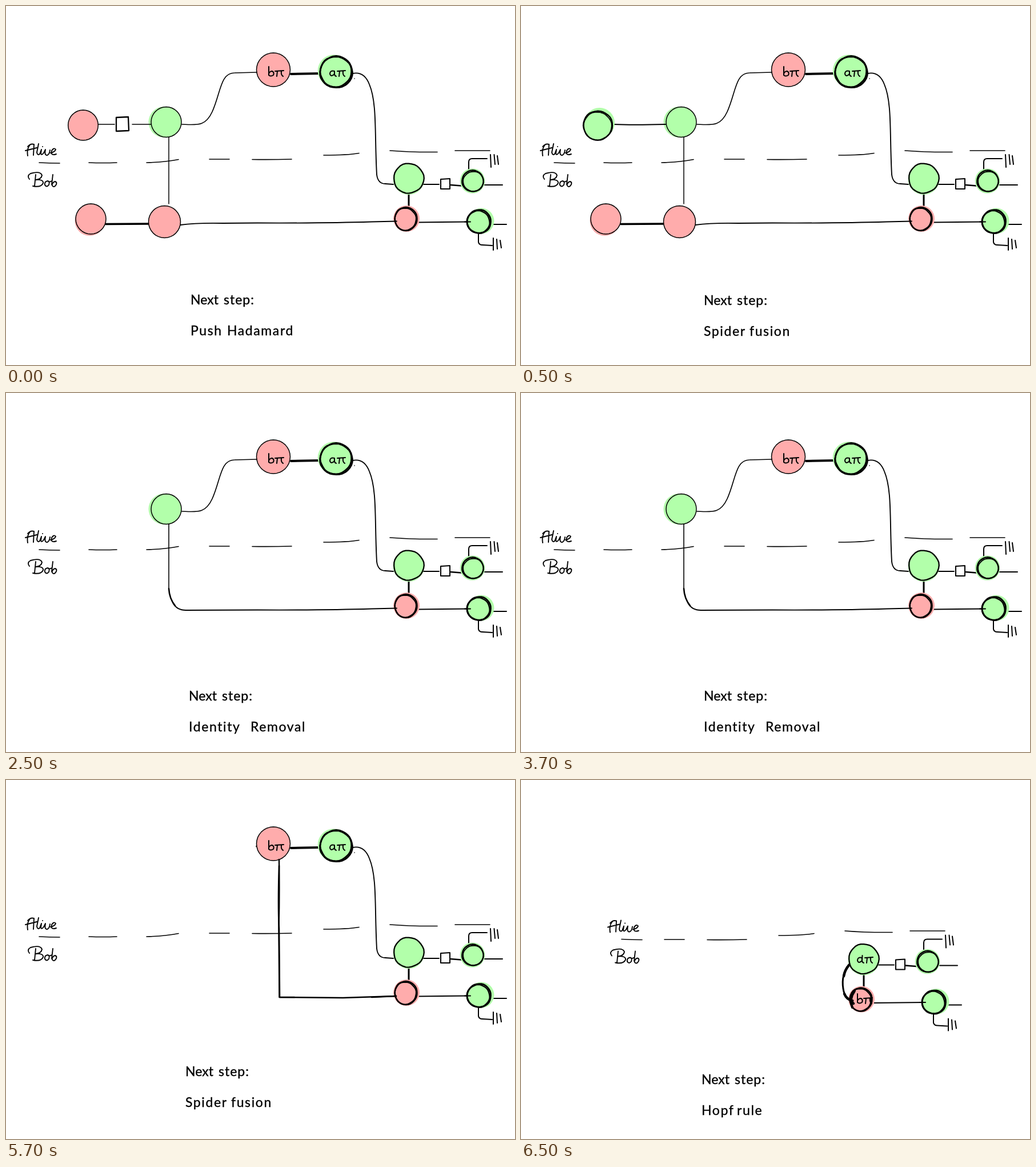
Write an HTML page that moves like this. It is 891x628 px and loops after 8 s.

```html
<!DOCTYPE html>
<html lang="en">
<head>
<meta charset="utf-8">
<title>Diagram rewriting</title>
<style>
html, body { margin: 0; width: 100%; height: 100%; overflow: hidden; background: #fff; }
svg { display: block; width: 100vw; height: 100vh; }
path { stroke-linecap: round; stroke-linejoin: round; }
text { font: 23px Lato, "Noto Sans", sans-serif; fill: #000; stroke: #000; stroke-width: .35px; }
.rule { letter-spacing: 1.6px; }
</style>
</head>
<body>
<svg id="stage" viewBox="0 0 891 628"></svg>
<script>
const PINK = '#ffacac', GREEN = '#b2ffaa';
const LOOP = 8000;

const ink = (d, w = 2) => `<path d="${d}" fill="none" stroke="#000" stroke-width="${w}"/>`;
const move = (x, y, body) => `<g transform="translate(${x} ${y})">${body}</g>`;

// Closed hand-drawn ring; k sets how uneven it is.
function ring(x, y, rx, ry, k = 0, phase = 0) {
  let d = '';
  for (let i = 0; i < 32; i++) {
    const a = i * Math.PI / 16;
    const r = 1 + k * (Math.sin(3 * a + phase) + .7 * Math.sin(7 * a + 2 * phase));
    d += (i ? 'L' : 'M') + (x + rx * r * Math.cos(a)).toFixed(1) + ' ' + (y + ry * r * Math.sin(a)).toFixed(1);
  }
  return d + 'Z';
}

function node(x, y, rx, ry, color, o = {}) {
  const { halo, w = 1.5, k = 0, again } = o;
  let s = '';
  if (halo) s += `<circle cx="${x + halo[0]}" cy="${y + halo[1]}" r="${halo[2]}" fill="${color}"/>`;
  s += `<path d="${ring(x, y, rx, ry, k, x)}" fill="${color}" stroke="#000" stroke-width="${w}"/>`;
  if (again) s += ink(ring(x + again[0], y + again[1], rx - 1, ry - 1, .015, y), w * .8);
  return s;
}

function caption(x, y, first, second, gap) {
  return `<text y="${y}"><tspan x="${x}">Next</tspan> <tspan x="${x + 58}" letter-spacing="1">step:</tspan></text>` +
    `<text class="rule" y="${y + 54}"><tspan x="${x}">${first}</tspan> <tspan x="${x + gap}">${second}</tspan></text>`;
}

// Handwritten labels
const alive = ink('M42 243Q36 250 38 262M38 246Q43 240 49 242L48 261M34 253L54 248M57 241L54 256Q55 262 59 259L62 251L61 258Q62 262 66 257L69 251Q67 262 72 261Q76 260 77 252M78 257Q86 255 87 251Q84 247 80 253Q78 263 88 259M64 246h.1', 1.9);
const bob = ink('M52 295L50 315M41 303Q36 297 43 293Q60 288 63 296Q62 303 52 304Q66 303 65 310Q61 318 47 315M73 306Q67 307 68 313Q71 318 75 313Q77 307 73 306Q76 309 80 306M82 295L80 312Q82 318 86 315Q91 309 86 307Q82 308 81 312', 1.9);
const bPi = ink('M460 106L460 121Q463 124 468 121Q470 116 466 114Q462 114 460 118M471 114L486 113M475 114L474 123M482 114Q481 121 485 123');
const aPi = ink('M575 114Q567 112 567 119Q569 125 575 119L575 114Q574 122 578 123M580 114L594 113M584 114L583 123M590 114Q589 121 593 123');

// Border between the two parties
const names = alive + bob + ink('M58 274Q76 275 94 275', 1.6);
const dashLeft = ink('M145 274Q170 275 194 274M246 274Q280 273 302 268.5', 1.6);
const dashRight = ink('M356 268H391M431 268.5Q465 269 500 268M556 261Q598 261 618 257.5M672 253Q710 256 755 255.5M786 253H847', 1.6);

// Output side
const outWires = ink('M729 312H758M838 313H869M853 382H876M719 378.5L813 377.5') +
  ink('M778 313L797 314.5', 2.6) + ink('M705 328V351', 3) +
  ink('M761 303L777 302L777 320L761 320Z') +
  ink('M810 289V273Q810 267 816 267H842M848 260L849 282M854.5 260L856 277M860 262L862 277') +
  ink('M827 399V413Q828 418 834 418L851 419M853 406V427M859 408L860 425M865 410L867 423');
const outputs = outWires +
  node(705, 301.5, 26.3, 26, GREEN, { halo: [0, 1, 27.5], w: 2.3, k: .015 }) +
  node(700, 372.5, 19.5, 20.5, PINK, { halo: [1, -.5, 23], w: 2.5, k: .01, again: [-.8, .5] }) +
  node(817, 306, 18.8, 18.5, GREEN, { halo: [-.5, 0, 21.8], w: 2.4, k: .01, again: [1, 1] }) +
  node(828, 377, 20.8, 20.5, GREEN, { halo: [4, -1, 22.5], w: 2.8, k: .012, again: [-1.2, .8] }) +
  ink('M803 377.5H813');

// Parts shared by several steps
const drop = ink('M607 118Q627 114 636 137C650 170 645 225 649 295Q651 311 664 311L678 312', 1.9);
const topPair = ink('M499 119L549 118', 4) +
  node(468, 111.5, 29.5, 29.5, PINK) + bPi +
  node(578, 115.5, 28.3, 27.5, GREEN, { halo: [-4, -2, 28.3], w: 3, k: .012, again: [-.8, -.5] }) + aPi +
  ink('M610 127h.1', 1.6);
const rise = ink('M308 207C335 208 349 211 361 185C376 152 375 117 400 117L439 116', 1.7);
const alivePhase = node(280.5, 203, 26.5, 26.5, GREEN, { halo: [-4, 0, 27] });
const longWire = ink('M305 383Q335 379 380 380L440 379.5Q560 380 640 377.5L684 376.5', 1.8);
const right = dashRight + drop + topPair + outputs;

const bell = ink('M285 229V346', 1.5) + ink('M175 381.5L249 381', 3.5) + longWire +
  node(148.5, 372.5, 26.5, 26.5, PINK, { halo: [-2, 3.5, 26] }) +
  node(277.5, 377.5, 28, 28, PINK);
const full = names + dashLeft + right + rise + alivePhase + bell;

const steps = [
  [0, full +
    ink('M161 207H190M221 207H254', 1.5) +
    ink('M193 195L214 194L215 218L193 219Z', 2.3) +
    node(135, 208.5, 26.3, 26.5, PINK) +
    caption(323, 522, 'Push', 'Hadamard', 64)],
  [500, full +
    ink('M161 207Q195 208.5 253 207', 2) +
    node(134.5, 209, 25.5, 25.5, GREEN, { halo: [3, -4.5, 26.5], w: 2.3, k: .012, again: [-.5, 1] }) +
    caption(320, 523, 'Spider', 'fusion', 80)],
  [2500, names + dashLeft + right + rise + alivePhase +
    ink('M285 229V342', 1.6) + ink('M285 342Q286 360 296 372', 2.6) +
    ink('M292 367Q299 380 315 380L440 379.5Q560 380 640 377.5L684 376.5', 1.9) +
    caption(320, 538, 'Identity', 'Removal', 108)],
  [4500, names + dashLeft + right +
    ink('M478 139Q479 200 477.5 260L478.5 380L590 381L683 378', 2.4) +
    ink('M478 150Q476 220 478 260L479 380L505 380M640 380L683 378', 2.6) +
    ink('M438 116h.1', 1.8) +
    caption(314, 518, 'Spider', 'fusion', 80)],
  [6500, move(118, 4.5, names) + move(-105, 11, dashRight) +
    move(-105, 11.5, outputs) +
    ink('M575 322Q560 340 564 365Q567 385 581 386', 3) +
    ink('M574 324Q567 332 565 343M566 374Q570 384 580 386M575 384L582 391', 4.5) +
    ink('M580 398Q574 383 584 369', 4) +
    move(22, 197, aPi) + ink('M597.5 307L597 315') + move(129, 268, bPi) +
    caption(316, 532, 'Hopf', 'rule', 62)]
];

const stage = document.getElementById('stage');
stage.innerHTML = '<rect width="891" height="628" fill="#fff"/>' + steps.map(s => `<g>${s[1]}</g>`).join('');
const layers = [...stage.children].slice(1);

function draw(t) {
  const now = steps.filter(s => s[0] <= t).length - 1;
  layers.forEach((g, i) => g.style.display = i === now ? '' : 'none');
}

const start = performance.now();
function tick() {
  draw((performance.now() - start) % LOOP);
  requestAnimationFrame(tick);
}
draw(0);
requestAnimationFrame(tick);
</script>
</body>
</html>
```
